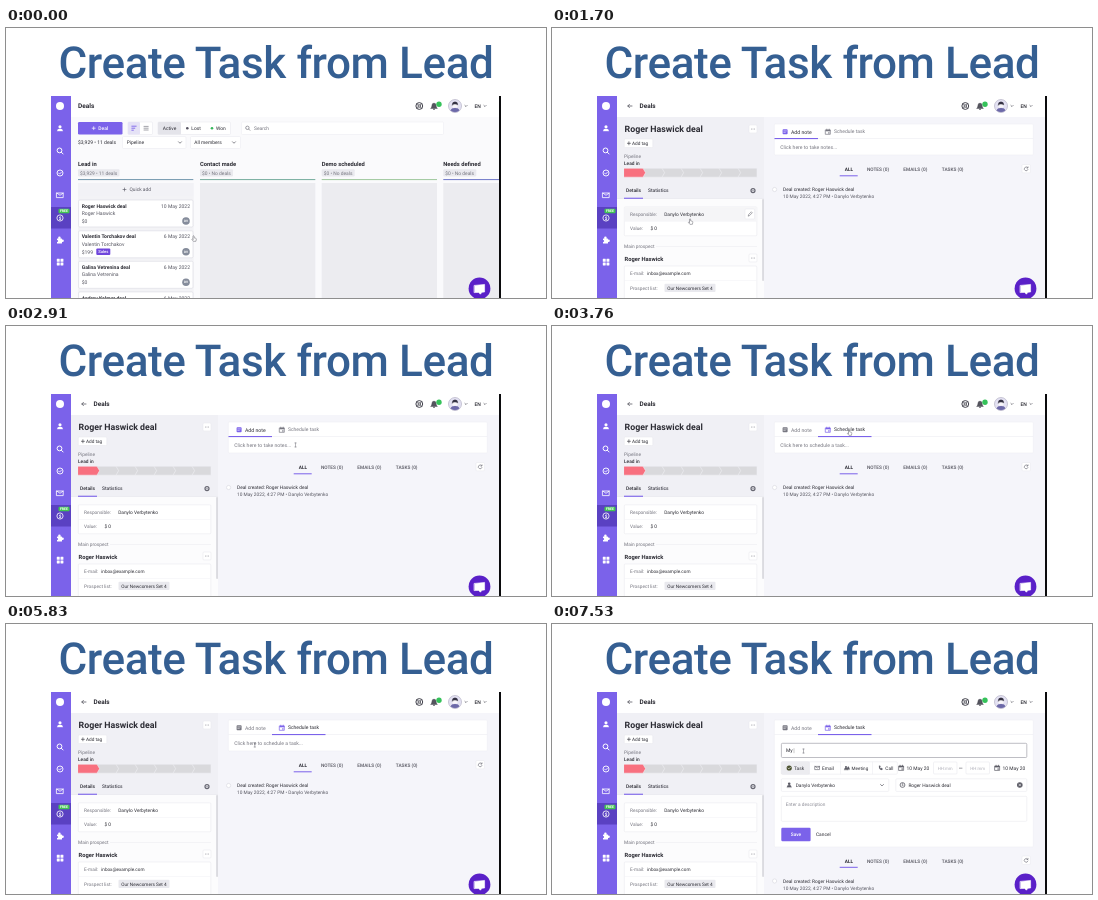
An HTML page that plays this animation: 540x270 px, repeating every 8 s.

```html
<!DOCTYPE html>
<html lang="en">
<head>
<meta charset="utf-8">
<title>Create Task from Lead</title>
<style>
html, body { margin: 0; width: 100%; height: 100%; overflow: hidden; background: #fff; }
svg { display: block; width: 540px; height: 270px; font-family: Roboto, "Liberation Sans", sans-serif; text-rendering: geometricPrecision; }
</style>
</head>
<body>
<svg id="stage" viewBox="0 0 540 270"></svg>
<script>
const INK = '#2b2b33', MUTE = '#74747e', LINE = '#e9e9ef', CHIP = '#e9e9ee', VIOLET = '#7b62ea';
const person = 'Roger Haswick', deal = person + ' deal', owner = 'Danylo Verbytenko';

// Drawing helpers; text y is the middle of the capitals.
const T = (x, y, s, size = 4.9, fill = INK, weight = 400, anchor = 'start') =>
  `<text x="${x}" y="${y + size * 0.355}" font-size="${size}" fill="${fill}" font-weight="${weight}" text-anchor="${anchor}">${s}</text>`;
const R = (x, y, w, h, fill = '#fff', stroke = 'none', r = 0) =>
  `<rect x="${x}" y="${y}" width="${w}" height="${h}" rx="${r}" fill="${fill}" stroke="${stroke}" stroke-width=".6"/>`;
const C = (x, y, r, fill = 'none', stroke = 'none', w = 0.8) =>
  `<circle cx="${x}" cy="${y}" r="${r}" fill="${fill}" stroke="${stroke}" stroke-width="${w}"/>`;
const P = (d, stroke = MUTE, w = 0.8, fill = 'none') =>
  `<path d="${d}" stroke="${stroke}" stroke-width="${w}" fill="${fill}" stroke-linecap="round" stroke-linejoin="round"/>`;
const G = (id, s) => `<g id="${id}">${s}</g>`;

const chev = (x, y, w = 1.5) => P(`M${x - w} ${y - w / 2}l${w} ${w}l${w} ${-w}`, '#55555f', 0.7);
const lens = (x, y, r, c) => C(x, y, r, 'none', c, r / 2.4) + P(`M${x + r * 0.8} ${y + r * 0.8}l${r * 0.7} ${r * 0.7}`, c, r / 2.4);
const dollar = (x, y, c, r) => C(x, y, r, 'none', c, 0.8) + T(x, y, '$', r * 1.5, c, 700, 'middle');
const more = (x, y) => R(x - 4, y - 4, 8, 8, '#fff', LINE, 1) + [-1.6, 0, 1.6].map(d => C(x + d, y, 0.45, MUTE)).join('');
const man = (x, y, c, k = 1) => C(x, y - 1.3 * k, 1.3 * k, c) + P(`M${x - 2.3 * k} ${y + 2.3 * k}q0 -2.2 ${2.3 * k} -2.2t${2.3 * k} 2.2z`, c, 0.2, c);
const mail = (x, y, w, h, c, lw = 0.8) => P(`M${x - w} ${y - h}h${2 * w}v${2 * h}h${-2 * w}zl${w} ${h}l${w} ${-h}`, c, lw);
const calendar = (x, y, c) => P(`M${x - 2.3} ${y - 2}h4.6v4.4h-4.6zM${x - 1.2} ${y - 2.8}v1M${x + 1.2} ${y - 2.8}v1`, c, 0.7) + R(x - 2.3, y - 2, 4.6, 1.4, c) + R(x + 0.2, y + 0.4, 1.3, 1.3, c);

function frame() {
  const w = '#fff';
  let s = `<text x="270" y="50.2" font-size="44" font-weight="500" letter-spacing="-.4" fill="#355f92" text-anchor="middle">Create Task from Lead</text>`;
  s += R(65, 68, 429, 202, '#fafafc') + R(65, 68, 429, 21, w) + R(45, 68, 20, 202, VIOLET) + R(45, 179, 20, 21.5, '#5a41c2');
  s += C(54, 78, 4, w) + man(54, 100.3, w, 1.2) + lens(53.5, 122.4, 2.4, w);
  s += C(54, 145, 3, 'none', w, 0.9) + P('M52.5 145l1.1 1.1l2 -2.1', w) + mail(54, 167.3, 3.2, 2.3, w) + dollar(54, 190, w, 3.1);
  s += R(52.5, 180.7, 11, 4.6, '#42c553', 'none', 1) + T(58, 183, 'FREE', 3.5, w, 700, 'middle');
  s += R(51, 210.4, 5, 5, w, 'none', 0.5) + C(53.4, 209.9, 1.3, w) + C(56.5, 212.8, 1.3, w) + C(51.2, 213, 0.9, VIOLET);
  for (const [x, y] of [[50.8, 230.8], [54.5, 230.8], [50.8, 234.5], [54.5, 234.5]]) s += R(x, y, 2.9, 2.9, w, 'none', 0.3);
  return s;
}

function header() {
  let s = C(413.3, 78, 3.4, 'none', '#44444e', 1) + C(413.3, 78, 1.3, 'none', '#44444e', 0.8);
  s += P('M410.9 75.6l1.4 1.4M415.7 75.6l-1.4 1.4M410.9 80.4l1.4 -1.4M415.7 80.4l-1.4 -1.4', '#44444e', 0.8);
  s += P('M425 80.2q1 -.8 1 -2.6q0 -2.4 2 -2.4t2 2.4q0 1.8 1 2.6z', '#44444e', 0.6, '#55555f') + C(428, 81.2, 0.8, '#44444e') + C(433, 76.2, 2.7, '#35c25a');
  s += C(449, 78, 6.5, '#e4e2f3', '#a9a6bd', 0.6) + C(449, 77.4, 2.7, '#f8f6fa') + P('M446.2 77q0 -3.2 2.8 -3.2t2.8 3.2q-2.8 -1.8 -5.6 0z', '#343243', 0.3, '#343243');
  s += P('M444.8 82.5q.5 -2.4 4.2 -2.4t4.2 2.4q-4.2 3 -8.4 0z', '#6c69a8', 0.2, '#6c69a8');
  return s + chev(460, 78, 1.1) + T(468.5, 78, 'EN', 5, INK, 500) + chev(479, 78, 1.1);
}

function card(y, name, date, sum, tag) {
  let s = R(72.6, y, 114.4, 27, '#fff', '#d9d9e1', 1.2) + T(75.7, y + 5.9, name + ' deal', 5.05, INK, 700);
  s += T(184, y + 5.9, date, 5.05, '#555560', 400, 'end') + T(75.7, y + 13.4, name, 5.05, '#555560') + T(75.7, y + 21, sum, 5.05, '#555560');
  if (tag) s += R(90.3, y + 17.6, 14, 6.5, '#7046dc', 'none', 1) + T(97.3, y + 20.9, tag, 4.2, '#fff', 500, 'middle');
  return s + C(180, y + 21, 3.8, '#858c9b') + T(180, y + 21, 'DV', 3.2, '#fff', 700, 'middle');
}

function board() {
  let s = T(72, 78, 'Deals', 6.5, INK, 700);
  s += R(72, 94, 44.5, 12.5, VIOLET, 'none', 1.2) + P('M86.2 100.2h3M87.7 98.7v3', '#fff', 0.7) + T(92.3, 100.2, 'Deal', 5, '#fff', 500);
  s += R(122, 94, 24.5, 12.5, '#fff', LINE, 1) + R(122, 94, 12, 12.5, '#e5e2f6', 'none', 1);
  s += P('M125.8 98.2h4.4M125.8 100.2h3M125.8 102.2h1.6', VIOLET, 0.9) + P('M138 98.4h4.2M138 100.2h4.2M138 102h4.2', '#666671', 0.6);
  s += R(152, 94, 72.5, 12.5, '#fff', LINE, 1) + R(152, 94, 23, 12.5, '#e4e4ea', 'none', 1) + T(163.5, 100.2, 'Active', 4.9, INK, 400, 'middle');
  s += C(181.3, 100.2, 1.3, '#585563') + T(185.3, 100.2, 'Lost') + C(206, 100.2, 1.3, '#36b85c') + T(210, 100.2, 'Won');
  s += R(235.5, 94, 202, 12.5, '#fff', '#efeff4', 1) + lens(241.4, 99.8, 1.7, MUTE) + T(248, 100.2, 'Search', 4.9, MUTE);
  s += T(72, 114.5, '$3,929 • 11 deals', 5);
  s += R(116.5, 108.5, 63.5, 12, '#fff', '#ececf1', 1) + T(120.7, 114.5, 'Pipeline') + chev(174, 114.5);
  s += R(184.5, 108.5, 50, 12, '#fff', '#ececf1', 1) + T(188.3, 114.5, 'All members') + chev(228, 114.5);
  const cols = [[72, 'Lead in', '#7d9fb4'], [194, 'Contact made', '#7fb2a4'], [315.7, 'Demo scheduled', '#a5cba4'], [437.3, 'Needs defined', '#7a82cc']];
  cols.forEach(([x, name, c], i) => {
    const w = Math.min(115.3, 494 - x);
    s += T(x, 136, name, 5.75, INK, 700) + R(x, 141.2, i ? 33 : 41.5, 7.4, CHIP, 'none', 1);
    s += T(x + 2, 145, i ? '$0 • No deals' : '$3,929 • 11 deals', 4.9, MUTE) + R(x, 151, w, 1.1, c) + R(x, 155, w, 115, '#ececf0');
  });
  s += R(72, 155, 115.3, 13, '#f2f2f6') + R(72, 168, 115.3, 102, '#f3f3f6') + P('M117 161.5h3M118.5 160v3', '#555560', 0.6) + T(123.5, 161.5, 'Quick add', 4.85, '#555560');
  s += card(172, person, '10 May 2022', '$0') + card(202.8, 'Valentin Torchakov', '6 May 2022', '$199', 'Sales');
  return s + card(233.3, 'Galina Vetrenina', '6 May 2022', '$0') + card(263.9, 'Andrey Kolmer', '6 May 2022', '$0');
}

function details() {
  let s = R(212, 89, 282, 181, '#f5f5fa') + R(65, 89, 147, 82, '#f0f0f5') + P('M80 78h-4.2m1.7 -1.7l-1.7 1.7l1.7 1.7', '#44444e', 0.7) + T(87.6, 78, 'Deals', 6.4, INK, 700);
  s += T(72.6, 101, deal, 8.8, INK, 700) + more(201, 101);
  s += R(72.3, 111, 28.5, 8.6, '#fff', LINE, 1) + P('M75.4 115.3h3M76.9 113.8v3', INK, 0.6) + T(80, 115.3, 'Add tag', 4.7);
  s += T(72, 128, 'Pipeline', 4.8, MUTE) + T(72, 135, 'Lead in', 4.8, INK, 500);
  for (let i = 6; i >= 0; i--) {
    const x = 72 + i * 19, tip = i < 6 ? 'l2.6 4.5l-2.6 4.5' : 'v9';
    s += P(`M${x} 140.2h19${tip}h-19z`, '#f0f0f5', 0.6, i ? '#d9d9dc' : '#f8707f');
  }
  s += R(65, 170.2, 147, 0.6, LINE) + R(65, 171, 147, 99, '#fcfcfd');
  s += T(74, 162.6, 'Details', 4.9, INK, 500) + T(96, 162.6, 'Statistics', 4.9, '#44444e', 500) + R(72, 169.7, 19, 1.1, VIOLET);
  s += C(201, 162.6, 2, 'none', '#666671', 1.2) + C(201, 162.6, 0.6, '#666671');
  s += R(72.3, 178.8, 132.5, 29, '#fff', LINE, 1);
  s += G('hover', R(72.6, 179.1, 131.9, 14, '#f5f5f7') + R(193, 181, 9.6, 10, '#fff', LINE, 1) + P('M196.3 187.8l.4 -1.4l2.6 -2.6l1 1l-2.6 2.6z', '#55555f', 0.5));
  s += R(72.6, 193, 131.9, 0.5, '#f0f0f4');
  s += T(78, 186, 'Responsible:', 4.75, MUTE) + T(112.2, 186, owner, 4.8) + T(78, 200.5, 'Value:', 4.75, MUTE) + T(98.4, 200.5, '$ 0', 4.8);
  s += T(72, 218.4, 'Main prospect', 4.8, MUTE) + R(104, 218.2, 101, 0.5, LINE);
  s += T(72.6, 230.6, person, 5.75, INK, 700) + more(201, 230);
  s += R(72.3, 238, 132.5, 36, '#fff', LINE, 1) + R(72.6, 252.5, 131.9, 0.5, '#f0f0f4');
  s += T(78, 245.4, 'E-mail:', 4.75, MUTE) + T(95.2, 245.4, 'inbox@example.com', 4.65) + T(78, 260, 'Prospect list:', 4.75, MUTE);
  s += R(112.5, 255.8, 51, 8.2, CHIP, 'none', 1) + T(138, 260, 'Our Newcomers Set 4', 4.7, INK, 400, 'middle');
  return s + R(210.3, 171, 1.5, 82, '#d2d2d8', 'none', 0.7);
}

function tabs(id, schedule) {
  const a = schedule ? '#777781' : INK, b = schedule ? INK : '#777781';
  const ai = schedule ? '#777781' : VIOLET, bi = schedule ? VIOLET : '#777781';
  let s = R(230.6, 101.2, 5, 5, ai, 'none', 0.8) + P('M231.8 102.9h2.6M231.8 104.4h1.5', '#fff', 0.5) + T(239, 103.7, 'Add note', 5.15, a);
  s += calendar(276, 103.9, bi) + T(282, 103.7, 'Schedule task', 5, b);
  return G(id, s + (schedule ? R(266, 110, 53.5, 1.1, VIOLET) : R(222.5, 110, 43.5, 1.1, VIOLET)));
}

function form() {
  const icon = '#5c5c66';
  let s = R(222.3, 96, 259, 127, '#fff', '#eeeef3', 1) + R(222.5, 110.5, 258.6, 0.5, LINE);
  s += `<rect id="field" x="229.4" y="119.3" width="245.4" height="14.2" rx="1" fill="#fff" stroke-width=".7"/>`;
  s += `<text id="typed" x="234" y="128.4" font-size="5" fill="${INK}"></text>` + G('caret', R(241.8, 124.2, 0.4, 5, '#777'));
  s += R(229.3, 137.8, 116, 12.4, '#fff', LINE, 1) + R(229.3, 137.8, 28, 12.4, '#ececf0', LINE, 1);
  s += C(237.2, 144, 2.6, '#4c5230') + P('M236 144l.9 .9l1.6 -1.7', '#fff', 0.6) + T(242, 144, 'Task', 4.8);
  s += mail(265.3, 144, 2.2, 1.6, icon, 0.6) + T(270, 144, 'Email', 4.8) + man(294, 144, icon, 0.8) + man(296.3, 144, icon, 0.6) + T(299.6, 144, 'Meeting', 4.6);
  s += P('M327 142.2q-.2 3.4 3 3.8l.6 -1.2l-1.2 -.7l-.6 .4q-.7 -.5 -.8 -1.2l.5 -.5l-.5 -1.1z', icon, 0.3, icon) + T(333.3, 144, 'Call', 4.8);
  s += [257.3, 288, 320.5].map(x => R(x, 137.8, 0.5, 12.4, LINE)).join('');
  for (const x of [346.8, 442.8]) s += calendar(x + 2.5, 144, icon) + T(x + 7.8, 144, '10 May 20', 4.9);
  for (const x of [381.5, 414]) s += R(x, 138, 23.5, 12, '#fff', LINE, 1) + T(x + 11.7, 144, 'HH:mm', 4.4, '#b1b1ba', 400, 'middle');
  s += R(407, 143.8, 3.4, 0.6, icon);
  s += R(229.3, 154.8, 107.5, 12.6, '#fff', LINE, 1) + man(237.2, 161, icon) + T(243.7, 161, owner, 4.75) + chev(330, 161.2);
  s += R(343.8, 154.8, 131, 12.6, '#fff', LINE, 1) + dollar(350.5, 161, icon, 2.4) + T(356.4, 161, deal, 4.8);
  s += C(467.8, 161, 2.8, icon) + P('M466.8 160l2 2m0 -2l-2 2', '#fff', 0.6);
  s += R(229.3, 172.3, 245.5, 25, '#fff', LINE, 1) + T(233.8, 180, 'Enter a description', 4.75, '#8b8b95');
  s += R(229.3, 203.8, 29.3, 13.4, VIOLET, 'none', 1.2) + T(244, 210.5, 'Save', 4.8, '#fff', 500, 'middle') + T(264, 210.5, 'Cancel', 4.8);
  return G('form', s);
}

function feed() {
  let s = [['ALL', 292.8, INK, 700], ['NOTES (0)', 315], ['EMAILS (0)', 351.3], ['TASKS (0)', 389.8]]
    .map(([n, x, c = '#55555f', w = 500]) => T(x, 141.5, n, 4.75, c, w)).join('');
  s += R(287.7, 147.3, 18, 1, VIOLET) + R(470, 136.5, 8.4, 8.4, '#fff', LINE, 1) + P('M475.7 139.7a1.9 1.9 0 1 0 .3 1.8M476 138.8v1.2h-1.2', '#666671', 0.6);
  s += C(222.6, 161.5, 2.1, '#fff', '#dcdce3', 0.7) + T(231, 161.5, 'Deal created: ' + deal, 4.8, INK);
  return G('feed', s + T(231, 168.6, '10 May 2022, 4:27 PM • ' + owner, 4.8, '#55555f'));
}

function cursor() {
  const hand = P('M-1 .6V-2.4q.6 -.8 1.1 0V-.7l1.7 .5q.6 .2 .5 1L1.9 2.8H-.6L-2.1 .9q.2 -.9 1.1 -.3z', '#5c5c64', 0.5, '#fff');
  const arrow = P('M-1.5 -3v5.4l1.3 -1.2l.9 2l.8 -.4l-.9 -1.9h1.7z', '#fff', 0.4, '#333');
  const beam = P('M-.7 -2h1.4M0 -2v4M-.7 2h1.4', '#6a6a72', 0.5);
  return G('cursor', G('hand', hand) + G('arrow', arrow) + G('beam', beam));
}

const bar = R(222.3, 96, 259, 31, '#fff', '#eeeef3', 1) + R(222.5, 110.5, 258.6, 0.5, LINE) +
  `<text id="hint" x="228.3" y="120.9" font-size="5.1" fill="#777781"></text>`;
const chat = C(473.5, 260.4, 10.9, '#5a20c8') + P('M468.4 257.4l10.2 -1v7.6l-2.6 .2l-1.6 2l-1.8 -1.8l-4.2 .2z', '#fff', 0.6, '#fff');
document.getElementById('stage').innerHTML = frame() + G('board', board()) +
  G('detail', details() + feed() + G('bar', bar) + form() + tabs('noteTab', false) + tabs('taskTab', true)) +
  header() + chat + cursor() + R(493, 68, 2, 202, '#0b0b0d');

// time, x, y, eased
const path = [
  [30, 188, 210.5], [670, 139.5, 194, 1], [1300, 139.5, 194], [1430, 139, 193.5], [1700, 138.5, 193.5],
  [2380, 133, 184, 1], [2600, 176, 160], [2910, 289.5, 119], [3200, 297, 108], [3240, 297, 108],
  [3420, 297.5, 106.5], [4480, 297.5, 106.5], [4680, 279.5, 117.5], [5160, 249.5, 121],
  [5550, 249.5, 121], [5580, 248.8, 121], [6580, 248.8, 121], [7050, 251.5, 127, 1]
];
function pointAt(t) {
  const i = path.findIndex(k => k[0] > t);
  if (i < 0) return path[path.length - 1].slice(1, 3);
  if (!i) return path[0].slice(1, 3);
  const a = path[i - 1], b = path[i];
  let p = (t - a[0]) / (b[0] - a[0]);
  if (b[3]) p = p * p * (3 - 2 * p);
  return [a[1] + (b[1] - a[1]) * p, a[2] + (b[2] - a[2]) * p];
}

const $ = id => document.getElementById(id);
const show = (id, on) => $(id).setAttribute('display', on ? 'inline' : 'none');

function render(t) {
  const open = t >= 5890, task = t >= 3760;
  show('board', t < 1580);
  show('detail', t >= 1580);
  show('hover', t < 2370);
  show('noteTab', !task);
  show('taskTab', task);
  show('bar', !open);
  show('form', open);
  show('caret', t >= 7530);
  $('hint').textContent = task ? 'Click here to schedule a task...' : 'Click here to take notes...';
  $('typed').textContent = t < 7210 ? '' : t < 7450 ? 'M' : 'My';
  $('field').setAttribute('stroke', t < 7210 ? '#d9d9e1' : '#a2a2ab');
  $('feed').setAttribute('transform', `translate(0 ${open ? 95.5 : 0})`);
  const kind = t < 2400 ? 'hand' : t < 2830 ? 'arrow' : t < 3080 ? 'beam' : t < 4760 ? 'hand' : 'beam';
  for (const k of ['hand', 'arrow', 'beam']) show(k, k === kind);
  $('cursor').setAttribute('transform', `translate(${pointAt(t)})`);
}

const start = performance.now();
function tick() {
  render((performance.now() - start) % 8000);
  requestAnimationFrame(tick);
}
tick();
</script>
</body>
</html>
```
